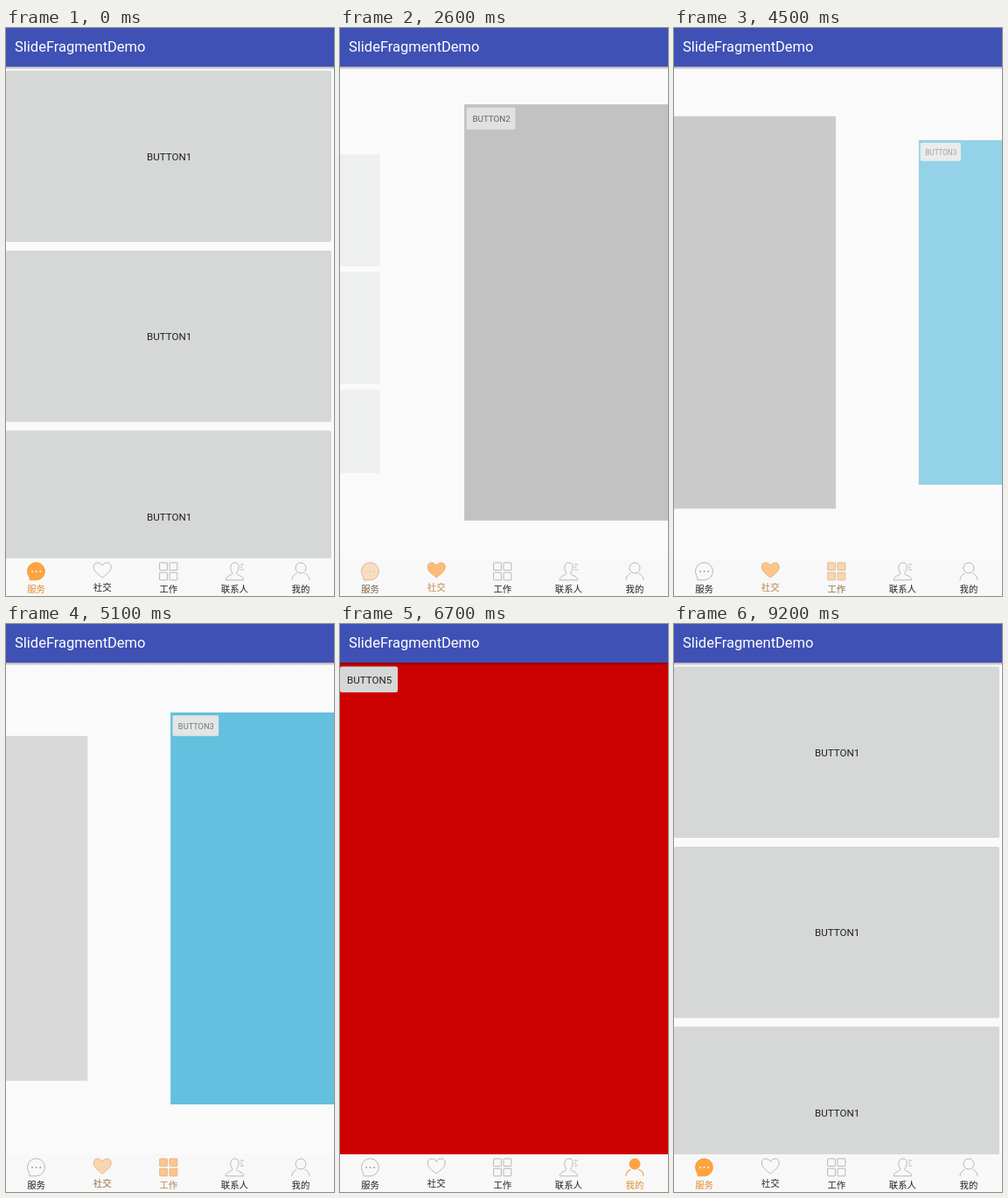
These frames come from a looping animation (375 by 648 pixels, 9300 ms). An HTML page:

```html
<!DOCTYPE html>
<html lang="zh-CN">
<head>
<meta charset="utf-8">
<title>SlideFragmentDemo</title>
<style>
  html, body { margin: 0; width: 100%; height: 100%; overflow: hidden; background: #fafafa; }
  #stage { display: block; width: 375px; height: 648px; }
  text { font-family: Roboto, sans-serif; }
  .button rect { fill: #d6d7d7; }
  .button text { font-size: 11.6px; fill: #222; text-anchor: middle; }
  .tab text { font: 10.4px "Noto Sans CJK SC", "Noto Sans CJK", sans-serif; text-anchor: middle; }
  .plain { fill: none; stroke: #a8a8a8; stroke-width: .8; }
  .plain text { fill: #222; stroke: none; }
  .plain .dot { fill: #999; stroke: none; }
  .active { fill: #ffa340; stroke: #f09a3c; stroke-width: .8; }
  .active text { fill: #e08c2e; stroke: none; }
  .active .dot { fill: #fff; stroke: none; }
  .active .line { fill: none; stroke-width: 1.1; }
</style>
</head>
<body>
<svg id="stage" viewBox="0 0 375 648">
  <defs>
    <linearGradient id="shade" x2="0" y2="1">
      <stop stop-opacity=".34"/>
      <stop offset="1" stop-opacity="0"/>
    </linearGradient>
  </defs>
  <rect width="375" height="648" fill="#fafafa"/>
  <g id="pages"></g>
  <rect y="44" width="375" height="3.5" fill="url(#shade)"/>
  <rect width="375" height="44" fill="#3f51b5"/>
  <text x="10" y="27" font-size="16.5" fill="#fff">SlideFragmentDemo</text>
  <rect y="605" width="375" height="43" fill="#f8f8f8"/>
  <g id="tabs"></g>
</svg>
<script>
const LOOP = 9300, STEP = 100;
// The screen is slightly wider than the stage and cut off at the left.
const W = 378, H = 561, LEFT = -3, TOP = 44;
const $ = id => document.getElementById(id);

const button = (label, y, w, h) => `<g class="button">
  <rect x="3" y="${y}" width="${w}" height="${h}" rx="2"/>
  <text x="${3 + w / 2 + .7}" y="${y + h / 2 + 4.6}">${label}</text></g>`;

const colored = (color, n) =>
  `<rect width="${W}" height="${H}" fill="${color}"/>` + button("BUTTON" + n, 4.5, 66, 29.5);

const pages = [
  [0, [0, 1, 2].map(i => button("BUTTON1", 4.5 + i * 205.4, 372, 195.5)).join("")],
  [1, colored("#aaa", 2)],
  [2, colored("#09c", 3)],
  [4, colored("#c00", 5)]
];

$("pages").innerHTML = pages.map(([, body]) =>
  `<g><svg width="${W}" height="${H}">${body}</svg></g>`).join("");

const path = (d, cls = "") => `<path class="${cls}" d="${d}"/>`;
const icons = [
  path("M-7.5 9.8H0A10 10 0 1 0-9 4.5Q-7.2 7-7.5 9.8Z") +
    [-4.6, 0, 4.6].map(x => `<circle class="dot" cx="${x}" r=".9"/>`).join(""),
  path("M0 7C-4 4-10 0-10-5C-10-8.5-8-10-5.5-10C-3-10-1-8.7 0-6.7C1-8.7 3-10 5.5-10C8-10 10-8.5 10-5C10 0 4 4 0 7Z"),
  [-10.2, 1.2].map(x => [-10, 1.2].map(y =>
    `<rect x="${x}" y="${y}" width="8.8" height="8.6" rx=".6"/>`).join("")).join(""),
  path("M-10.3 9.8C-10.3 6-6 5-3.2 3.4Q-2.2 2.6-3 1C-5-2-5-5-4-7.5C-3-9.6-1-10 .5-10C4-10 5.2-7.5 4.6-4C4.2-1 3 .5 2.4 1.4Q1.8 2.8 3 3.4C6 5 10.3 6 10.3 9.8Z") +
    path("M6.5-8H10.5M6.5-5H9M6.5-2H10.5", "line"),
  `<circle cy="-4" r="6"/>` + path("M-10 10C-10 6-7.5 3.4-4.5 2.2M10 10C10 6 7.5 3.4 4.5 2.2", "line")
];
const labels = ["服务", "社交", "工作", "联系人", "我的"];

$("tabs").innerHTML = labels.map((label, i) => {
  const look = icons[i] + `<text y="${i === 1 ? 22.4 : 23.8}">${label}</text>`;
  return `<g class="tab" transform="translate(${LEFT + W * (i + .5) / 5 - .2} 620)">
    <g class="plain">${look}</g><g class="active">${look}</g></g>`;
}).join("");

// [time, page position, ease-out power of the way there]
const keys = [
  [0, 0], [600, 0], [700, .02], [1700, .35], [2600, .693], [3300, 1, 2],
  [3600, 1], [3700, 1.03], [4500, 1.402], [5600, 1.757], [6100, 2, 3.5],
  [6700, 2]
];
const jumps = [[8600, 0], [7900, 1], [7300, 2], [6700, 4]];

function position(t) {
  const jump = jumps.find(j => t >= j[0]);
  if (jump) return jump[1];
  const i = keys.findIndex(k => k[0] > t);
  const [t0, p0] = keys[i - 1], [t1, p1, power = 1] = keys[i];
  return p1 - (p1 - p0) * (1 - (t - t0) / (t1 - t0)) ** power;
}

function draw(t) {
  const pos = position(t);
  const presence = i => Math.max(0, 1 - Math.abs(i - pos));
  pages.forEach(([i], n) => {
    const el = $("pages").children[n], alpha = presence(i);
    const x = LEFT + W / 2 + W * (i - pos), scale = (1 + alpha) / 2;
    el.style.display = alpha ? "" : "none";
    el.setAttribute("opacity", alpha);
    el.setAttribute("transform",
      `translate(${x} ${TOP + H / 2}) scale(${scale}) translate(${-W / 2} ${-H / 2})`);
  });
  [...$("tabs").children].forEach((tab, i) => {
    const [plain, active] = tab.children, alpha = presence(i);
    plain.setAttribute("opacity", 1 - alpha);
    active.setAttribute("opacity", alpha);
  });
}

const start = performance.now();
function tick() {
  const t = (performance.now() - start) % LOOP;
  draw(Math.floor(t / STEP) * STEP);
  requestAnimationFrame(tick);
}
tick();
</script>
</body>
</html>
```
